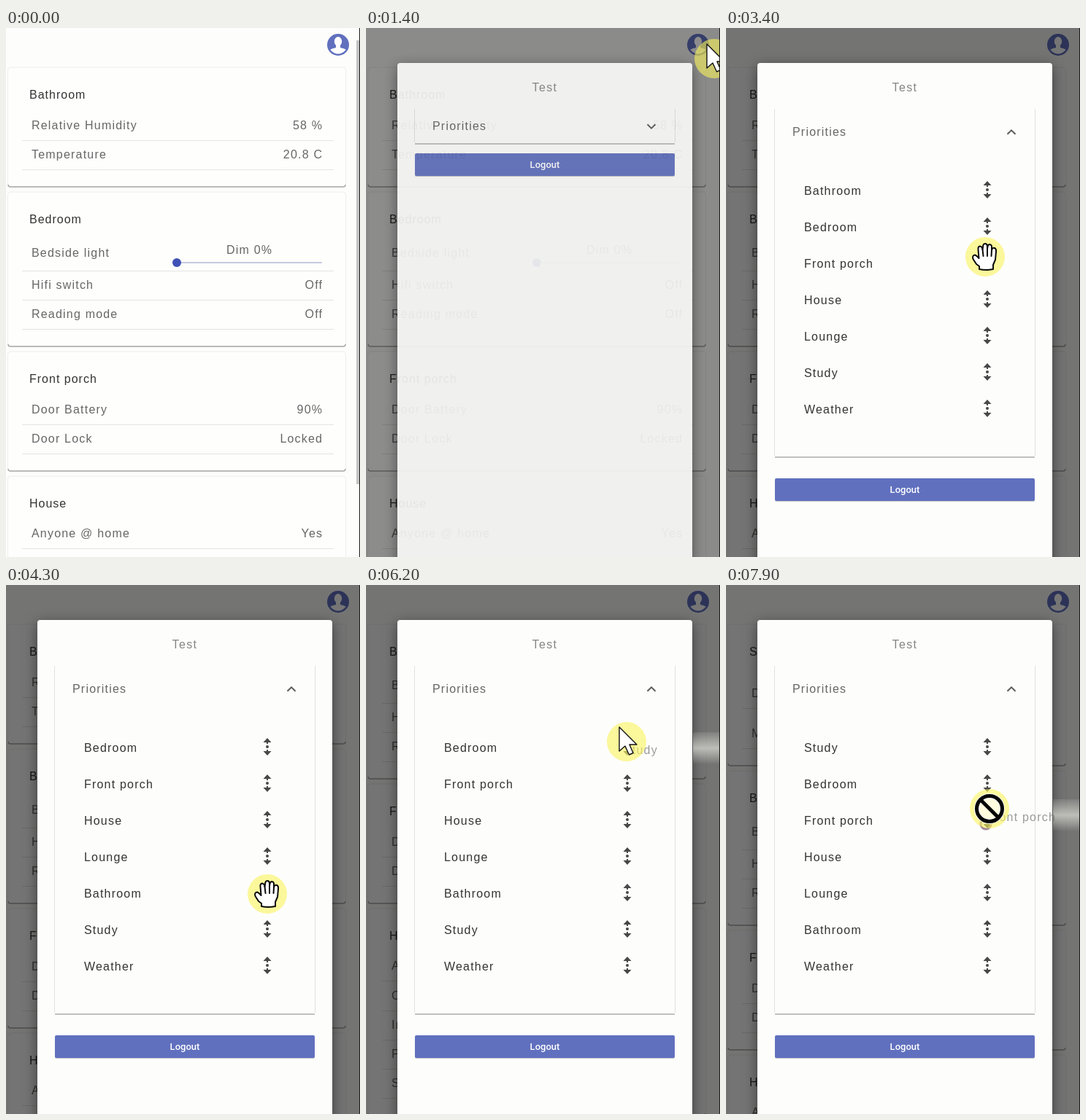
Animation of 485x726 px, one loop 8000 ms. Source, as an HTML page:

```html
<!DOCTYPE html>
<html lang="en">
<head>
<meta charset="utf-8">
<title>Dashboard priorities</title>
<style>
html, body { margin: 0; width: 100%; height: 100%; overflow: hidden; background: #fdfdfb; }
svg { display: block; width: 100vw; height: 100vh; }
text { font: 16px "Liberation Sans", Arial, sans-serif; letter-spacing: 1.2px; white-space: pre; fill: #666; }
.title { fill: #333; letter-spacing: 1px; }
.item { fill: #333; }
.button { font: 500 13px Roboto, sans-serif; letter-spacing: 0; fill: #fff; }
#modalBox { filter: drop-shadow(0 5px 9px rgba(0, 0, 0, .5)); }
</style>
</head>
<body>
<svg viewBox="0 0 485 726" id="stage">
  <defs>
    <clipPath id="panelClip"><rect id="clipBox" x="67" y="111" width="356" height="48"/></clipPath>
    <clipPath id="faceClip"><circle cx="455" cy="23" r="12.5"/></clipPath>
    <linearGradient id="ghostFill" x1="0" y1="0" x2="0" y2="1">
      <stop offset="0" stop-color="#f0f0e8" stop-opacity=".1"/>
      <stop offset=".5" stop-color="#f0f0e8" stop-opacity=".6"/>
      <stop offset="1" stop-color="#f0f0e8" stop-opacity="0"/>
    </linearGradient>
  </defs>
  <rect width="485" height="726" fill="#fdfdfb"/>
  <g id="cards"></g>
  <rect id="scrollbar" x="480" y="17" width="4" height="609" fill="#c4c4c4"/>
  <circle cx="455" cy="23" r="15" fill="#6070be"/>
  <g clip-path="url(#faceClip)" fill="#fff">
    <ellipse cx="455" cy="18.5" rx="5.2" ry="6.5"/>
    <path d="M452 22h6v5q9 2 10 5v6h-26v-6q1-3 10-5z"/>
  </g>
  <rect id="shade" width="485" height="726"/>
  <g id="modal">
    <rect id="modalBox" x="43" y="48" width="404" height="700" rx="4" fill="#fdfdfb"/>
    <text x="227.5" y="87" style="letter-spacing:1.4px;fill:#858585">Test</text>
    <path id="sides" fill="none" stroke="#e2e2e0"/>
    <path id="base" stroke="#adadad" stroke-width="1.6"/>
    <text id="heading" x="91">Priorities</text>
    <path id="chevron" d="M-5.5 2.8L0-2.7L5.5 2.8" fill="none" stroke="#5c5c5c" stroke-width="2"/>
    <g id="rows" clip-path="url(#panelClip)"></g>
    <g id="logout">
      <rect x="67" y="1" width="356" height="31" rx="2" fill="#c2c2c8"/>
      <rect x="67" width="356" height="31" rx="2" fill="#6070be"/>
      <text class="button" x="245" y="20" text-anchor="middle">Logout</text>
    </g>
  </g>
  <g id="ghost">
    <rect id="ghostRow" width="300" height="44" fill="url(#ghostFill)"/>
    <text id="ghostText" opacity=".65"></text>
  </g>
  <circle id="ring" r="7" fill="none" stroke="#a58a98" stroke-width="3.2"/>
  <g id="cursor" stroke-linejoin="round" stroke-linecap="round">
    <circle r="27" fill="#fbf45c" opacity=".6"/>
    <g id="arrow" transform="translate(-10 -20)">
      <path d="M0 0V33L8 26L13.500 38L19 35.500L14 24H24Z" fill="#fff" stroke="#111" stroke-width="1.4"/>
    </g>
    <g id="point" transform="translate(-4.500 -22)" fill="#fff" stroke="#1a1a1a" stroke-width="1.6">
      <path d="M-3 2Q0-3 3 2V12Q7 8 9 13Q13 10 15 15Q20 13 22 19V30Q21 38 17 41V45H-1V42Q-6 36-11 27Q-11 22-7 24L-3 28Z"/>
      <path d="M3 12V21M9 13V22M15 15V23" fill="none"/>
    </g>
    <g id="grab" transform="translate(-18 -18)" fill="#fff" stroke="#0b0b0b" stroke-width="2">
      <path d="M10 35V31L6 28L1.500 21Q0 16 4 15.500Q6 16 9.500 20L8.500 8Q8 4 11 3.500Q14 4 14.500 8L15 5Q15 0 18 0Q21 0 21 4V7L21.500 4Q22 1 24.500 1Q27.500 1.500 27 6V9Q28 5 31 6Q33.500 7 33 11L32 22L29 29V35Q19 37 10 35Z"/>
      <path d="M14.500 8L15.500 17M21 7V17M27 9L26.500 17" fill="none"/>
    </g>
    <g id="deny" fill="none">
      <circle r="17.500" stroke="#fff" stroke-width="7" fill="#fffce0"/>
      <circle r="17.500" stroke="#050505" stroke-width="5"/>
      <path d="M-12-12L12 12" stroke="#050505" stroke-width="5"/>
    </g>
  </g>
  <rect x="484" width="1" height="726" fill="#1c1c1c"/>
</svg>
<script>
const LOOP = 8000, STEP = 100;
const $ = id => document.getElementById(id);
const clamp = v => Math.max(0, Math.min(1, v));
const ramp = (t, a, b) => clamp((t - a) / (b - a));
const smooth = u => u * u * (3 - 2 * u);
const mix = (a, b, u) => a + (b - a) * u;
const set = (el, attrs) => { for (const k in attrs) el.setAttribute(k, attrs[k]); };
const show = (el, on) => { el.style.display = on ? "" : "none"; };

function add(parent, tag, attrs, label) {
  const el = document.createElementNS("http://www.w3.org/2000/svg", tag);
  set(el, attrs);
  if (label) el.textContent = label;
  parent.appendChild(el);
  return el;
}

// Each row: offset below the card title, label, value.
const CARDS = {
  "Bathroom": { end: 127, rows: [[42, "Relative Humidity", "58 %"], [82, "Temperature", "20.8 C"]] },
  "Bedroom": { end: 175, rows: [[46, "Bedside light", "dim"], [90, "Hifi switch", "Off"], [130, "Reading mode", "Off"]] },
  "Front porch": { end: 127, rows: [[42, "Door Battery", "90%"], [82, "Door Lock", "Locked"]] },
  "House": { end: 247, rows: [[41, "Anyone @ home", "Yes"], [82, "Car", "Away"], [122, "Internet", "On"], [162, "Power", "On"], [202, "Security", "Off"]] },
  "Lounge": { end: 87, rows: [[42, "Lamp", "Off"]] },
  "Study": { end: 157, rows: [[57, "Desk light", "Off"], [112, "Monitor", "Off"]] },
  "Weather": { end: 87, rows: [[42, "Outside", "Dry"]] }
};
const START = Object.keys(CARDS);
const moved = (list, name, at) => {
  const rest = list.filter(n => n !== name);
  rest.splice(at, 0, name);
  return rest;
};
const SECOND = moved(START, "Bathroom", 4);
const THIRD = moved(SECOND, "Study", 0);
const orderAt = (t, a, b) => t < a ? START : t < b ? SECOND : THIRD;

const cards = {}, items = {};
for (const name of START) {
  const { end, rows } = CARDS[name];
  const g = cards[name] = add($("cards"), "g", {});
  add(g, "rect", { x: 2.5, y: -37, width: 463, height: end + 37, rx: 4, fill: "#fefefd", stroke: "#eeeeec" });
  add(g, "path", { d: `M3 ${end - 3}q0 3 3 3h456q3 0 3-3`, fill: "none", stroke: "#a8a8a8", "stroke-width": 1.5 });
  add(g, "text", { x: 32, y: 6, class: "title" }, name);
  for (const [dy, label, value] of rows) {
    const dim = value === "dim";
    add(g, "path", { d: `M22 ${dy + (dim ? 25.5 : 21.5)}H449`, stroke: "#e4e4e2" });
    add(g, "text", { x: 35, y: dy + 6 }, label);
    if (dim) {
      add(g, "text", { x: 302, y: dy + 2 }, "Dim 0%");
      add(g, "path", { d: `M234 ${dy + 14}H433`, stroke: "#c6cae0", "stroke-width": 2 });
      add(g, "circle", { cx: 234, cy: dy + 14, r: 6, fill: "#3f51b5" });
    } else {
      add(g, "text", { x: 434.2, y: dy + 6, "text-anchor": "end" }, value);
    }
  }
  const item = items[name] = add($("rows"), "g", { fill: "#484848" });
  add(item, "text", { x: 107, y: 6, class: "item" }, name);
  add(item, "path", { d: "M358-13l5.500 6h-4.500v2h-2v-2h-4.500zM358 11l5.500-6h-4.500v-2h-2v2h-4.500z" });
  add(item, "circle", { cx: 358, cy: -1, r: 2 });
}

// Cursor halo centre: time, x, y.
const PATH = [
  [700, 500, 150], [1000, 477, 42], [1500, 477, 42], [1900, 400, 158], [2500, 400, 158],
  [2900, 355, 314], [3400, 355, 314], [3600, 357, 218], [3800, 357, 218], [4200, 358, 424],
  [4600, 358, 424], [5400, 357, 466], [5700, 357, 466], [6200, 357, 215], [6500, 357, 215],
  [7000, 363, 380], [7500, 356, 333], [7800, 356, 333], [7900, 361, 307]
];
const CLICKS = [[1100, 1300, 467, 22], [2000, 2200, 396, 135], [3700, 3900, 357, 224],
  [5600, 5800, 357, 472], [7700, 8000, 356, 328]];
const DRAGS = [[3800, 4300, "Bathroom"], [5700, 6400, "Study"], [7800, 8000, "Front porch"]];
const during = (list, t) => list.find(e => t >= e[0] && t < e[1]);

function cursorAt(t) {
  const i = PATH.findIndex(k => k[0] > t);
  if (i < 0) return PATH[PATH.length - 1].slice(1);
  if (i === 0) return PATH[0].slice(1);
  const a = PATH[i - 1], b = PATH[i], u = smooth(ramp(t, a[0], b[0]));
  return [mix(a[1], b[1], u), mix(a[2], b[2], u)];
}

function cursorKind(t, drag) {
  if (drag) return t < drag[0] + 200 ? "deny" : "arrow";
  if (t < 1800) return "arrow";
  return t < 2700 ? "point" : "grab";
}

function drawPage(t) {
  let y = 91;
  for (const name of orderAt(t, 4600, 6600)) {
    show(cards[name], y < 770);
    set(cards[name], { transform: `translate(0 ${y})` });
    y += CARDS[name].end + 44;
  }
}

function drawModal(t) {
  const open = 1 - (1 - ramp(t, 1200, 1500)) ** 2;
  set($("shade"), { opacity: .54 * open ** 1.5 });
  show($("scrollbar"), open === 0);
  show($("modal"), open > 0);
  set($("modal"), { opacity: open });

  const head = smooth(ramp(t, 2000, 2300));
  const body = smooth(ramp(t, 2050, 2415));
  const bottom = 159 + 16 * head + 414 * body;
  const mid = 134 + 8 * head;
  set($("sides"), { d: `M66.500 111V${bottom - 2}M423.500 111V${bottom - 2}` });
  set($("base"), { d: `M67 ${bottom}H423` });
  set($("heading"), { y: mid + 6 });
  set($("chevron"), { transform: `translate(391 ${mid + 1}) rotate(${180 * (1 - head)})` });
  set($("clipBox"), { height: bottom - 111 });
  set($("rows"), { opacity: body });
  set($("logout"), { transform: `translate(0 ${bottom + 13 + 16 * head})` });
  orderAt(t, 4300, 6400).forEach((name, i) =>
    set(items[name], { transform: `translate(0 ${223 + 50 * i})` }));
}

function drawCursor(t) {
  const [x, y] = cursorAt(t), drag = during(DRAGS, t), click = during(CLICKS, t);
  show($("cursor"), t >= 700);
  set($("cursor"), { transform: `translate(${x} ${y})` });
  const kind = cursorKind(t, drag);
  for (const k of ["arrow", "point", "grab", "deny"]) show($(k), k === kind);
  show($("ring"), click);
  if (click) set($("ring"), { cx: click[2], cy: click[3] });
  show($("ghost"), drag);
  if (drag) {
    set($("ghostRow"), { x: Math.max(448, x - 20), y: y - 13 });
    set($("ghostText"), { x: x - 4, y: y + 17 });
    $("ghostText").textContent = drag[2];
  }
}

function draw(now) {
  const t = Math.floor(now % LOOP / STEP) * STEP;
  drawPage(t);
  drawModal(t);
  drawCursor(t);
}

let begin;
function tick(now) {
  begin ??= now;
  draw(Math.max(0, now - begin));
  requestAnimationFrame(tick);
}
draw(0);
requestAnimationFrame(tick);
</script>
</body>
</html>
```
